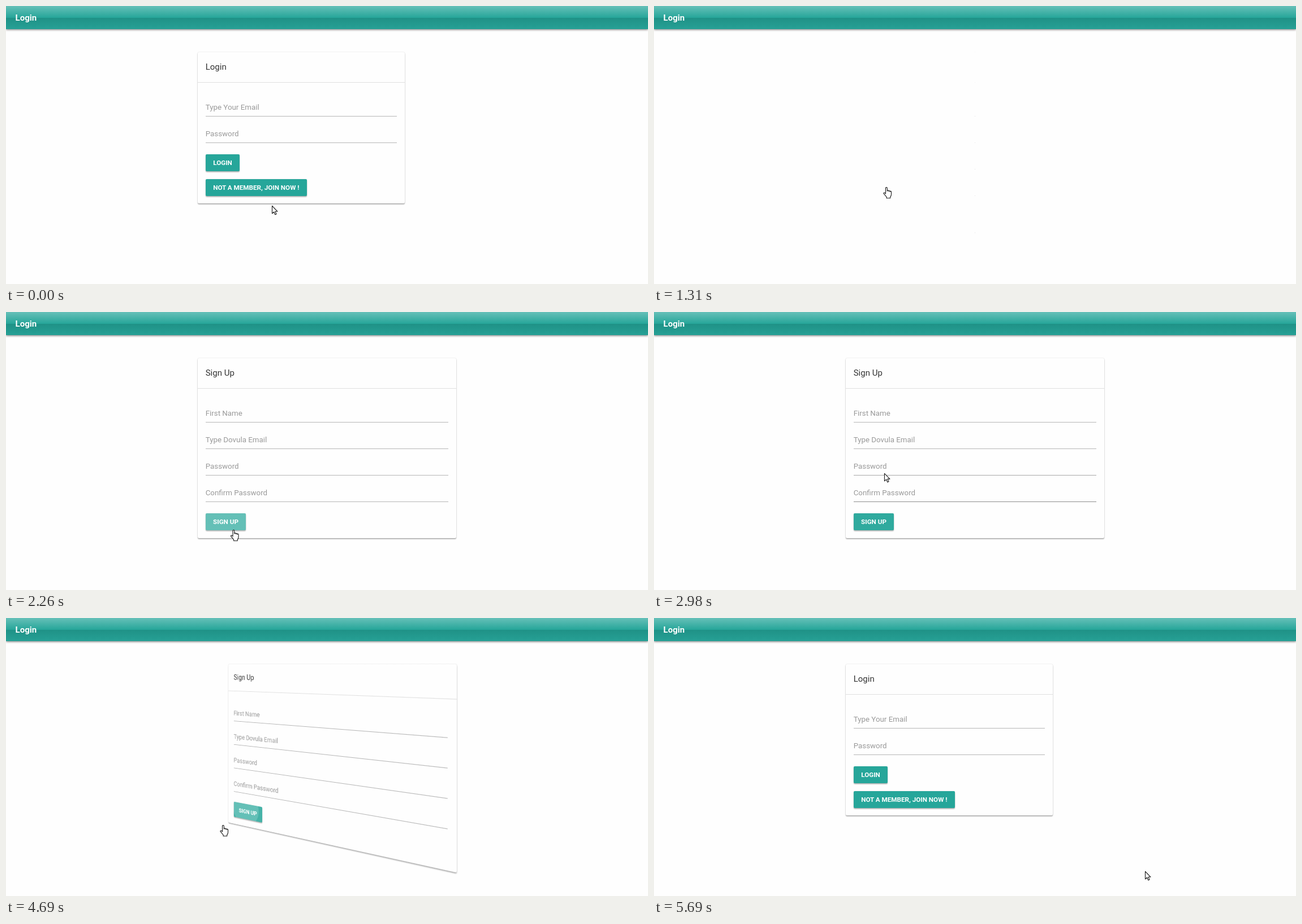
Animation, 1135 px wide and 493 px high, one loop 5.77 s. Source, as an HTML page:

```html
<!DOCTYPE html>
<html lang="en">
<head>
<meta charset="utf-8">
<title>Login</title>
<style>
  html, body { margin: 0; width: 100%; height: 100%; overflow: hidden; background: #fefefe; }
  body { position: relative; font: 13.33px Roboto, sans-serif; color: #333; }
  body * { position: absolute; box-sizing: border-box; white-space: nowrap; }
  nav {
    left: 0; top: 0; width: 100%; height: 41px; padding-left: 16.6px;
    font-size: 15px; font-weight: 700; line-height: 42px; color: #fff;
    background: linear-gradient(#66c0b8, #27a69a 50%, #1f9186 50%, #26a095);
    box-shadow: 0 1.7px 3.5px rgba(0, 0, 0, .5);
  }
  .card {
    left: 339px; top: 82px; background: #fefefe; border-radius: 2px; transform-origin: 50% 0;
    box-shadow: 0 1.7px 1.7px rgba(0, 0, 0, .3), 0 0 1.7px rgba(0, 0, 0, .2);
  }
  h1 {
    margin: 0; left: 0; top: 0; width: 100%; height: 54px; padding-left: 13.7px;
    font-size: 15px; font-weight: 400; line-height: 53.3px; border-bottom: 1px solid #e0e0e0;
  }
  .field { left: 13.7px; height: 32px; line-height: 32px; color: #999; border-bottom: 1px solid; }
  .button {
    left: 14px; height: 30px; line-height: 30px; border-radius: 2px; text-align: center;
    font-size: 11.67px; font-weight: 700; color: #fff; background: #26a69a;
    box-shadow: 0 1.7px 1.7px rgba(0, 0, 0, .28), 0 0 1.7px rgba(0, 0, 0, .12);
  }
  #press { left: -10px; top: -10px; width: 20px; height: 20px; border-radius: 50%; background: rgba(225, 232, 20, .75); }
  svg { left: 0; top: 0; width: 1px; height: 1px; overflow: visible; }
  path { fill: #fff; stroke: #1a1a1a; stroke-width: 1.1; stroke-linejoin: round; }
</style>
</head>
<body>
<nav>Login</nav>
<div id="pointer">
  <div id="press"></div>
  <svg>
    <path id="arrow" d="M.5.5V14L3.7 11.1 5.8 16 8 15 5.9 10.3H10Z"/>
    <path id="hand" d="M-1 11V2a1.4 1.4 0 0 1 2.8 0v5.2a1.3 1.3 0 0 1 2.6 0v.6a1.2 1.2 0 0 1 2.4 0v.7a1.1 1.1 0 0 1 2.2 0V13q0 3-1.8 4.5v2.2H.6v-2Q-1.2 15.5-4.4 11.6q-.4-1.6 1.2-1.6 1 .2 2.2 2z"/>
  </svg>
</div>
<script>
const LOOP = 5770, FLIP = 580, TO_SIGNUP = 1018, TO_LOGIN = 4628, FADE = 200;
const CARD_X = 339, CARD_Y = 82;
const $ = id => document.getElementById(id);

function add(parent, tag, text, cls = '') {
  const el = document.createElement(tag);
  el.className = cls;
  el.textContent = text;
  parent.append(el);
  return el;
}

function makeCard(title, width, height, labels, buttons) {
  const el = add(document.body, 'div', '', 'card');
  el.style.width = width + 'px';
  el.style.height = height + 'px';
  add(el, 'h1', title);
  const place = (cls, text, top, w, h) => {
    const part = add(el, 'div', text, cls);
    part.style.top = top + 'px';
    part.style.width = w + 'px';
    return { el: part, top, w, h };
  };
  return {
    el,
    fields: labels.map((text, i) => place('field', text, 82 + 47 * i, width - 27.4, 32)),
    buttons: buttons.map(([text, w], i) => place('button', text, 87.3 + 47 * labels.length + 43.5 * i, w, 30))
  };
}

const login = makeCard('Login', 365.5, 268.3, ['Type Your Email', 'Password'],
  [['LOGIN', 60], ['NOT A MEMBER, JOIN NOW !', 178.7]]);
const signup = makeCard('Sign Up', 457, 318.5,
  ['First Name', 'Type Dovula Email', 'Password', 'Confirm Password'], [['SIGN UP', 71]]);
document.body.append($('pointer'));

// Pointer moves: [start, end, x, y]
const moves = [
  [20, 420, 425, 302], [420, 680, 410.5, 321], [1600, 2190, 402, 386], [2400, 2660, 402, 372],
  [2780, 3210, 413, 181], [3610, 4310, 383.5, 367], [5400, 5690, 868, 449]
];

const ramp = (t, a, b) => Math.min(1, Math.max(0, (t - a) / (b - a)));
const smooth = u => u * u * (3 - 2 * u);

function pointerAt(t) {
  let x = 470, y = 354;
  for (const [start, end, toX, toY] of moves) {
    const u = smooth(ramp(t, start, end));
    x += (toX - x) * u;
    y += (toY - y) * u;
  }
  return [x, y];
}

// The card that reacts to the pointer; it changes when a flip is over
const active = t => t > TO_SIGNUP + FLIP && t < TO_LOGIN + FLIP ? signup : login;

function isOver(card, part, t) {
  const [x, y] = pointerAt(t), dx = x - CARD_X - 14, dy = y - CARD_Y - part.top;
  return active(t) === card && dx >= 0 && dx <= part.w && dy >= 0 && dy <= part.h;
}

// Hover fades in and out: the share of the recent past spent over the part
function hover(card, part, t) {
  const steps = 10;
  let sum = 0;
  for (let i = 0; i < steps; i++) sum += isOver(card, part, t - FADE * i / steps);
  return sum / steps;
}

// Turns to edge-on and back, fastest at both ends
function flip(t, start) {
  const u = ramp(t, start, start + FLIP);
  return 90 * (1 - Math.abs(2 * u - 1) ** 1.65);
}

function paintButton(card, part, t, age, x, y) {
  const light = `rgba(255,255,255,${.14 * hover(card, part, t)})`;
  const clicked = age > 0 && isOver(card, part, t);
  const r = clicked ? age * .5 : 0;
  part.el.style.backgroundImage =
    `radial-gradient(circle at ${x - CARD_X - 14}px ${y - CARD_Y - part.top}px,` +
    ` rgba(255,255,255,${clicked ? .17 : 0}) ${r}px, transparent ${r + 1}px),` +
    `linear-gradient(${light}, ${light})`;
}

function draw(t) {
  const [x, y] = pointerAt(t);
  const click = t < (TO_SIGNUP + TO_LOGIN) / 2 ? TO_SIGNUP : TO_LOGIN;
  const angle = flip(t, click);
  const shown = t >= TO_SIGNUP + FLIP / 2 && t < TO_LOGIN + FLIP / 2 ? signup : login;

  for (const card of [login, signup]) {
    card.el.style.display = card === shown ? '' : 'none';
    card.el.style.transform = angle ? `perspective(833px) rotateY(${-angle}deg)` : 'none';
    for (const part of card.buttons) paintButton(card, part, t, t - click, x, y);
    for (const part of card.fields) {
      const ink = 182 - 140 * hover(card, part, t);
      part.el.style.borderColor = `rgb(${ink},${ink},${ink})`;
    }
  }

  const onButton = active(t).buttons.some(part => isOver(active(t), part, t));
  $('pointer').style.transform = `translate(${x}px,${y}px)`;
  $('hand').style.display = onButton ? '' : 'none';
  $('arrow').style.display = onButton ? 'none' : '';
  $('press').style.display = Math.abs(t - click - 20) < 40 ? '' : 'none';
}

const start = performance.now();
function frame() {
  draw((performance.now() - start) % LOOP);
  requestAnimationFrame(frame);
}
frame();
</script>
</body>
</html>
```
